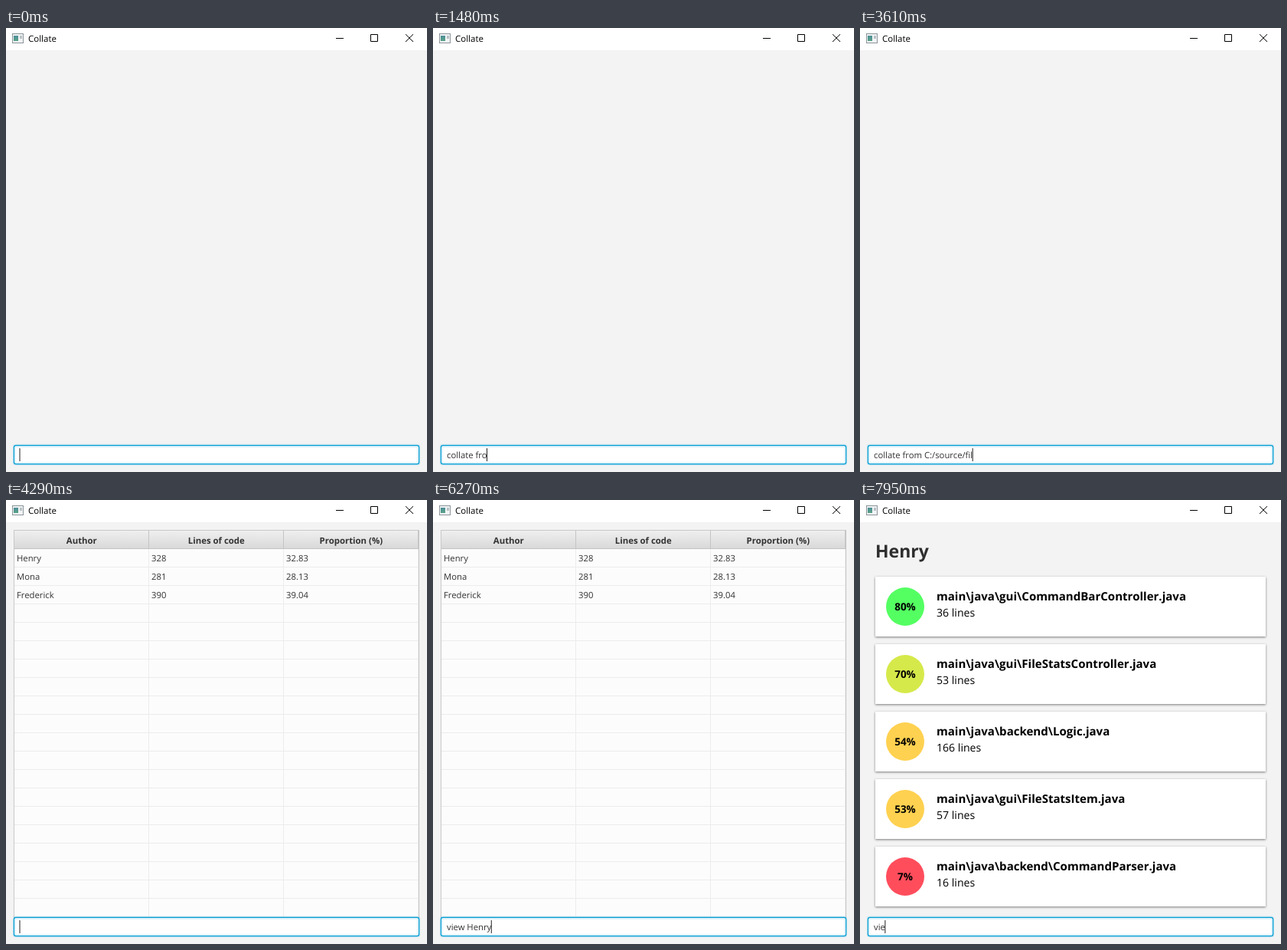
Animation of 550 by 579 pixels, one loop 8000 ms. Source, as an HTML page:

```html
<!DOCTYPE html>
<html lang="en">
<head>
<meta charset="utf-8">
<title>Collate</title>
<style>
  html, body { margin: 0; width: 550px; height: 579px; overflow: hidden; background: #f3f3f3; }
  svg { display: block; }
  text { font: 11.3px "Open Sans", "Noto Sans", sans-serif; fill: #333; white-space: pre; text-rendering: geometricPrecision; }
  .head { font-size: 11.4px; font-weight: 700; text-anchor: middle; }
  .name { font-size: 23px; font-weight: 700; fill: #2e2e2e; }
  .file { font-size: 15.05px; font-weight: 700; fill: #000; }
  .lines { font-size: 14.1px; fill: #000; }
  .pct { font-size: 13.5px; font-weight: 700; fill: #000; text-anchor: middle; }
  .card { fill: #fff; filter: drop-shadow(0 1.5px 1.5px rgba(0, 0, 0, .5)); }
</style>
</head>
<body>
<svg id="stage" width="550" height="579" viewBox="0 0 550 579">
  <defs>
    <linearGradient id="headFill" x2="0" y2="1">
      <stop offset="0" stop-color="#efefef"/>
      <stop offset="1" stop-color="#d9d9d9"/>
    </linearGradient>
    <linearGradient id="iconFill" x2="0" y2="1">
      <stop offset="0" stop-color="#4c8f98"/>
      <stop offset="1" stop-color="#5ba287"/>
    </linearGradient>
  </defs>
  <rect width="550" height="579" fill="#f3f3f3"/>

  <g id="titleBar">
    <rect width="550" height="29" fill="#fff"/>
    <rect x="8.5" y="7.5" width="14" height="12" fill="#f1f3f4" stroke="#8b9499"/>
    <rect x="10" y="10" width="6" height="7" fill="url(#iconFill)"/>
    <rect x="18" y="10" width="3" height="4" fill="#b9c1c5"/>
    <text x="29" y="18" style="font-size:11.5px;fill:#000">Collate</text>
    <g fill="none" stroke="#000">
      <path d="M431 13.5h10M476.5 8.5h9v9h-9z"/>
      <path d="M522 8.2l10 9.8M532 8.2l-10 9.8"/>
    </g>
  </g>

  <g id="table"></g>
  <g id="cards"></g>

  <g id="field">
    <rect x="9.8" y="543.8" width="530.4" height="25.4" rx="3" fill="#039ed3"/>
    <rect x="11" y="545" width="528" height="23" rx="2" fill="#fff"/>
    <rect x="8.6" y="542.6" width="532.8" height="27.8" rx="4" fill="#039ed3" fill-opacity=".13"/>
    <rect x="13" y="547" width="524" height="19" rx="1" fill="#fff"/>
    <text id="typed" x="18" y="561"></text>
    <rect id="caret" y="548" width="1" height="17" fill="#222"/>
  </g>
</svg>
<script>
const LOOP = 8000;
const person = "Henry";
const $ = id => document.getElementById(id);

function add(parent, tag, attrs, content = "") {
  const el = document.createElementNS("http://www.w3.org/2000/svg", tag);
  for (const key in attrs) el.setAttribute(key, attrs[key]);
  el.textContent = content;
  parent.append(el);
  return el;
}

function buildTable(g) {
  const heads = ["Author", "Lines of code", "Proportion (%)"];
  const rows = [[person, "328", "32.83"], ["Mona", "281", "28.13"], ["Frederick", "390", "39.04"]];
  add(g, "rect", { x: 10, y: 39, width: 530, height: 510, fill: "#c8c8c8" });
  add(g, "rect", { x: 11, y: 40, width: 528, height: 508, fill: "#fcfcfc" });
  add(g, "rect", { x: 11, y: 40, width: 528, height: 23, fill: "url(#headFill)" });
  add(g, "rect", { x: 11, y: 63, width: 528, height: 1, fill: "#c4c4c4" });
  for (let y = 87; y < 545; y += 24)
    add(g, "rect", { x: 11, y, width: 528, height: 1, fill: "#ececec" });
  heads.forEach((label, i) => {
    const x = 186 + 176 * i;
    add(g, "rect", { x, y: 64, width: 1, height: 480, fill: "#ececec" });
    add(g, "rect", { x, y: 40, width: 1, height: 23, fill: "#c4c4c4" });
    add(g, "text", { x: 98.8 + 176 * i, y: 57, class: "head" }, label);
  });
  rows.forEach((row, r) => row.forEach((cell, c) =>
    add(g, "text", { x: 14 + 176 * c, y: 80 + 24 * r }, cell)));
}

function buildCards(g) {
  const items = [
    [80, "gui\\CommandBarController", 36, "#54ff62"],
    [70, "gui\\FileStatsController", 53, "#d6e94a"],
    [54, "backend\\Logic", 166, "#ffd150"],
    [53, "gui\\FileStatsItem", 57, "#ffd150"],
    [7, "backend\\CommandParser", 16, "#ff4d5c"]
  ];
  add(g, "text", { x: 20, y: 75, class: "name" }, person);
  items.forEach(([pct, file, lines, fill], i) => {
    const y = 100 + 88 * i;
    add(g, "rect", { x: 20, y, width: 510, height: 78, class: "card" });
    add(g, "circle", { cx: 59, cy: y + 39, r: 25, fill });
    add(g, "text", { x: 59, y: y + 44, class: "pct" }, pct + "%");
    add(g, "text", { x: 100, y: y + 31, class: "file" }, `main\\java\\${file}.java`);
    add(g, "text", { x: 100, y: y + 52, class: "lines" }, lines + " lines");
  });
}

// Each scene: start time, visible panel, command, and the time of every keystroke.
const scenes = [
  { start: 0, text: "collate from C:/source/files", keys: [
    520, 660, 840, 920, 1000, 1070, 1150, 1220, 1400, 1440, 1480, 1580, 1630, 1860, 1970, 2280,
    2590, 2680, 2750, 2820, 3030, 3120, 3210, 3300, 3500, 3580, 3670, 3750] },
  { start: 4290, panel: "table", text: "view " + person, keys: [
    5080, 5260, 5350, 5440, 5530, 5780, 5960, 6110, 6190, 6270] },
  { start: 6890, panel: "cards", text: "view", keys: [7780, 7870, 7950] }
];
const caretOff = [[430, 520], [4560, 5020], [7310, 7780]];

function draw(t) {
  const scene = scenes.filter(s => s.start <= t).pop();
  const count = scene.keys.filter(k => k <= t).length;
  for (const id of ["table", "cards"])
    $(id).style.display = scene.panel === id ? "" : "none";
  const typed = $("typed");
  typed.textContent = scene.text.slice(0, count);
  const width = count ? typed.getComputedTextLength() : 0;
  const hidden = caretOff.some(([from, to]) => t >= from && t < to);
  $("caret").setAttribute("x", 17.5 + width);
  $("caret").style.display = hidden ? "none" : "";
}

buildTable($("table"));
buildCards($("cards"));

const begin = performance.now();
function tick() {
  draw((performance.now() - begin) % LOOP);
  requestAnimationFrame(tick);
}
tick();
</script>
</body>
</html>
```
